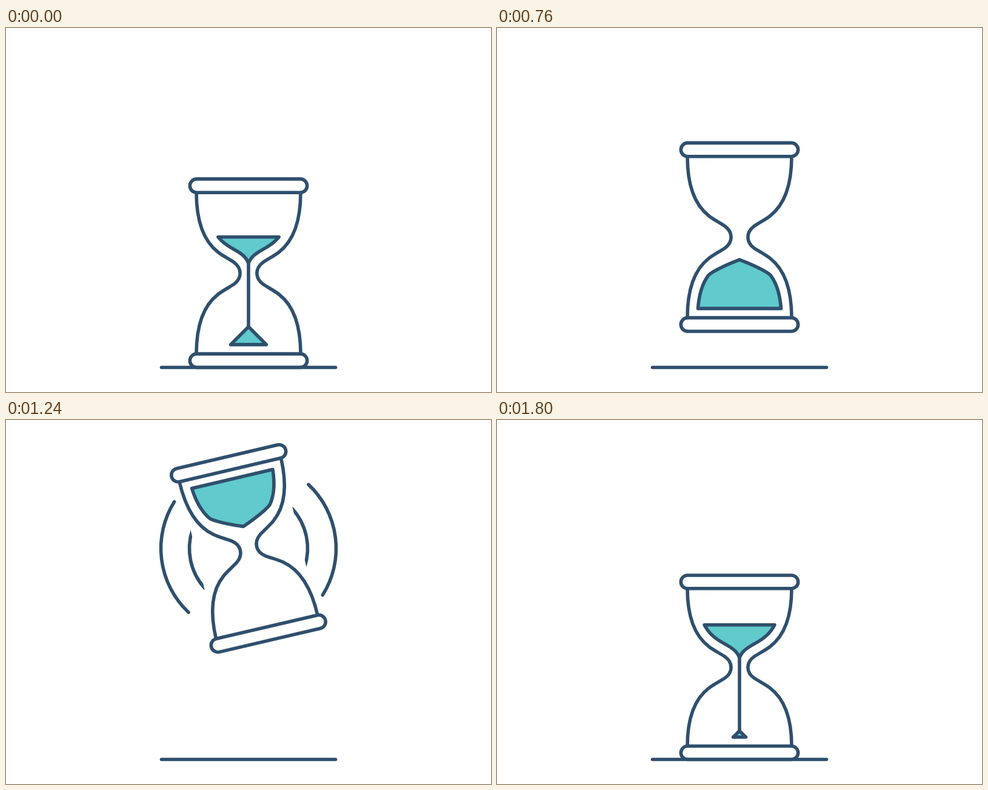
These frames come from a looping animation (800x600 px, 1840 ms). An HTML page with a canvas:

```html
<!DOCTYPE html>
<html lang="en">
<head>
<meta charset="utf-8">
<title>Hourglass</title>
<style>
  html, body { margin: 0; width: 100%; height: 100%; overflow: hidden; background: #fff; }
  canvas { display: block; }
</style>
</head>
<body>
<canvas id="stage" width="800" height="600"></canvas>
<script>
const ctx = document.getElementById('stage').getContext('2d');
const LOOP = 1840, STEP = 40;
const INK = '#2f506d', SAND = '#60cacc', PAPER = '#fff';
const GROUND = 559.5, HALF = 155.3, CAP = 22.4;
const RISE = 192.5, SQUASH = 20;
const FLOOR = 117.7, NECK = -16;

const clamp = v => Math.max(0, Math.min(1, v));
const span = (t, a, b) => clamp((t - a) / (b - a));
const mix = (a, b, k) => a + (b - a) * k;
const smooth = u => u * u * (3 - 2 * u);
const easeOut = (u, p) => 1 - Math.pow(1 - u, p);
const easeInOut = (u, p) => u < .5 ? .5 * (2 * u) ** p : 1 - .5 * (2 - 2 * u) ** p;
const blend = (a, b, k) => a.map((p, i) => [mix(p[0], b[i][0], k), mix(p[1], b[i][1], k)]);

// Samples chained cubic curves: start x, y, then six values per curve.
function curve(v) {
  const out = [[v[0], v[1]]], n = 24;
  for (let i = 0; i + 8 <= v.length; i += 6) {
    for (let j = 1; j <= n; j++) {
      const t = j / n, s = 1 - t;
      const at = k => s * s * s * v[i + k] + 3 * s * s * t * v[i + 2 + k] +
        3 * s * t * t * v[i + 4 + k] + t * t * t * v[i + 6 + k];
      out.push([at(0), at(1)]);
    }
  }
  return out;
}

// Left halves of the shapes, around the middle of the glass.
const heap = curve([-68.5, FLOOR, -67, 97, -62, 77, -51, 62.7, -43.5, 55.5, -19, 44.5, 0, 37.2]);
const full = heap.map(([x, y]) => [x, -y]);
const funnel = curve([-68.5, -FLOOR, -67, -97, -64, -82, -57, -70, -40, -38, -8, -40, 0, NECK]);
const cone = heap.map((p, i) => {
  const k = i / (heap.length - 1);
  return [-68.5 * (1 - k), FLOOR - 68.5 * k];
});

const glass = new Path2D();
for (const s of [-1, 1]) {
  const seg = (...v) => glass.bezierCurveTo(...v.map((n, i) => i % 2 ? n : n * s));
  glass.moveTo(86 * s, -HALF + CAP);
  seg(86, -88, 75, -54, 50.5, -35);
  seg(43, -29, 32, -23.5, 24, -18);
  seg(10.5, -8, 10.5, 8, 24, 18);
  seg(32, 23.5, 43, 29, 50.5, 35);
  seg(75, 54, 86, 88, 86, HALF - CAP);
}

function line(x1, y1, x2, y2) {
  ctx.beginPath();
  ctx.moveTo(x1, y1);
  ctx.lineTo(x2, y2);
  ctx.stroke();
}

function cap(y) {
  ctx.beginPath();
  ctx.roundRect(-96.7, y, 193.4, CAP, CAP / 2);
  ctx.fillStyle = PAPER;
  ctx.fill();
  ctx.stroke();
}

function sand(half) {
  ctx.beginPath();
  half.forEach(p => ctx.lineTo(p[0], p[1]));
  half.slice().reverse().forEach(p => ctx.lineTo(-p[0], p[1]));
  ctx.closePath();
  ctx.fillStyle = SAND;
  ctx.fill();
  ctx.stroke();
}

function below(half, y) {
  const i = half.findIndex(p => p[1] > y);
  if (i < 1) return half;
  const a = half[i - 1], b = half[i];
  return [[mix(a[0], b[0], (y - a[1]) / (b[1] - a[1])), y], ...half.slice(i)];
}

function pouring(t) {
  const grow = easeOut(span(t, 1782, 2200), 3.76);
  const shape = blend(cone, heap, smooth(clamp((grow - .45) / .55)));
  const pile = shape.map(([x, y]) => [x * grow, FLOOR + (y - FLOOR) * grow]);
  const top = pile[pile.length - 1][1];

  const head = Math.min(top, mix(NECK, FLOOR, span(t, 1690, 1780)));
  const tail = mix(NECK, top, span(t, 2140, 2190));
  if (t > 1690 && tail < head - .5) line(0, tail, 0, head);
  if (grow > 0) sand(pile);

  const level = mix(-FLOOR, NECK, easeOut(span(t, 1680, 2200), 2.3));
  const store = blend(full, funnel, span(t, 1680, 1730));
  if (level < NECK - 1.5) sand(below(store, level));
}

function swoosh(t, radius, from, to) {
  const head = mix(from, to, span(t, 1130, 1270));
  const tail = mix(from, to, span(t, 1215, 1355));
  if (head - tail < .5) return;
  for (const turn of [0, 180]) {
    ctx.beginPath();
    ctx.arc(400, GROUND - HALF - RISE, radius,
      (tail + turn) * Math.PI / 180, (head + turn) * Math.PI / 180);
    ctx.stroke();
  }
}

function lift(t) {
  if (t < 1080) return RISE * easeOut(span(t, 695, 1080), 2);
  return RISE * (1 - span(t, 1280, 1628) ** 1.95);
}

function squash(t) {
  const crouch = smooth(span(t, 560, 640)) - smooth(span(t, 640, 695));
  const land = smooth(span(t, 1628, 1740)) - smooth(span(t, 1740, 1840));
  return 1 - SQUASH * (crouch + land) / (2 * HALF);
}

function draw(t) {
  const pours = t < 560 || t >= 1680;
  ctx.fillStyle = PAPER;
  ctx.fillRect(0, 0, 800, 600);
  ctx.strokeStyle = INK;
  ctx.lineWidth = 5.6;
  ctx.lineCap = ctx.lineJoin = 'round';

  if (t > 1130 && t < 1355) {
    swoosh(t, 144.5, -70, 60);
    swoosh(t, 97.5, -60, 40);
  }

  ctx.save();
  ctx.translate(400, GROUND - lift(t));
  ctx.scale(1, squash(t));
  ctx.translate(0, -HALF);
  if (!pours) ctx.rotate(Math.PI * easeInOut(span(t, 1080, 1280), 2.1));
  ctx.fillStyle = PAPER;
  ctx.fill(glass);
  ctx.stroke(glass);
  if (pours) pouring(t < 560 ? t + LOOP : t);
  else sand(heap);
  cap(-HALF);
  cap(HALF - CAP);
  ctx.restore();

  line(256.5, GROUND, 543.5, GROUND);
}

const start = performance.now();
function tick() {
  const t = (performance.now() - start) % LOOP;
  draw(Math.floor(t / STEP) * STEP);
  requestAnimationFrame(tick);
}
tick();
</script>
</body>
</html>
```
